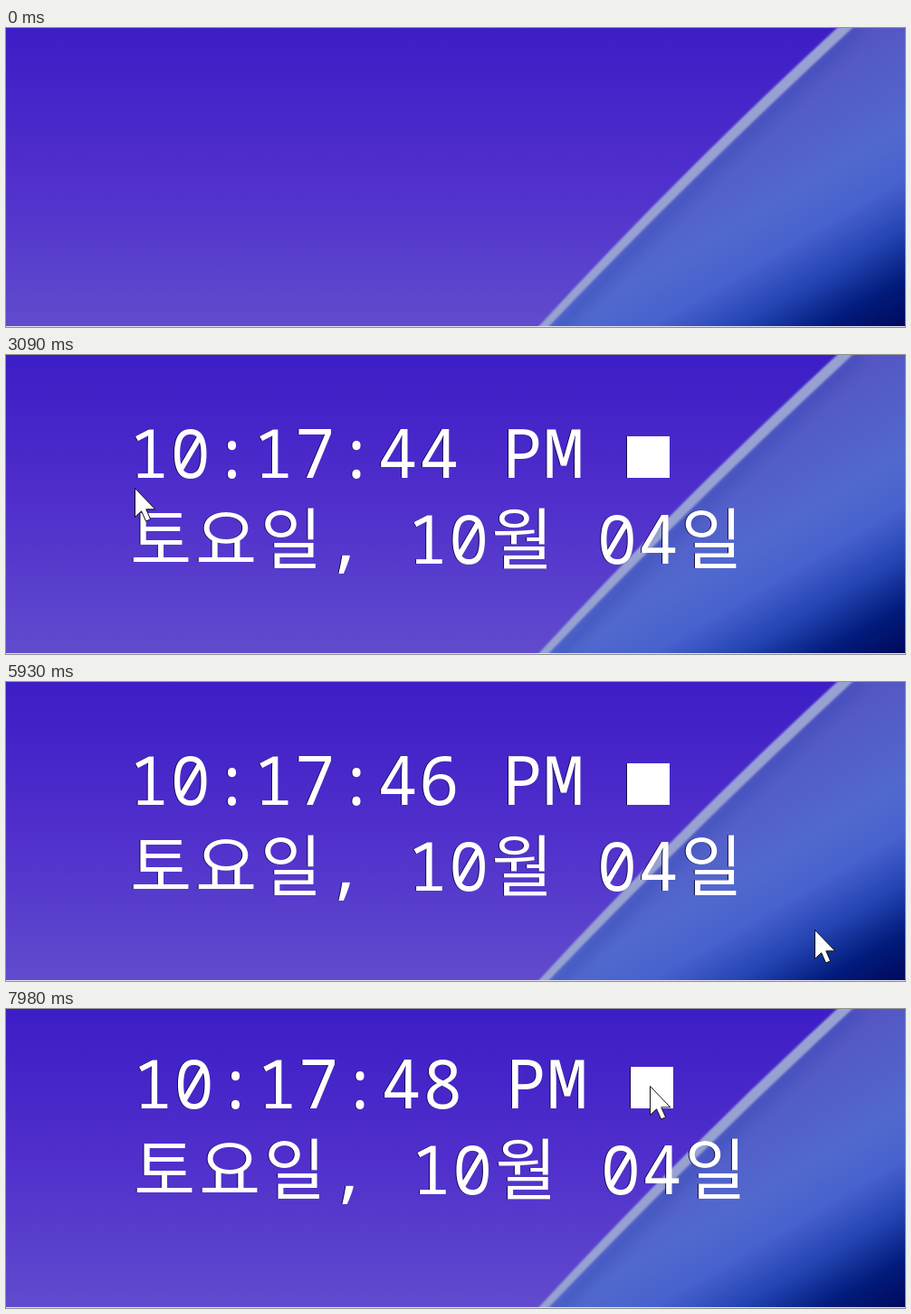
Recreate the animation shown at these times as an HTML page. Size 993x331 px, loop 8 s.

```html
<!DOCTYPE html>
<html lang="ko">
<head>
<meta charset="utf-8">
<style>
  html, body { margin: 0; width: 100%; height: 100%; overflow: hidden; background: #4f2fcc; }
  svg { display: block; width: 993px; height: 331px; }
  text { font: 74px "Noto Sans Mono", "Noto Sans CJK KR", "Noto Sans KR", monospace; text-anchor: middle; }
  #clock { fill: #fff; filter: drop-shadow(-1px 0 0 #160b45); }
</style>
</head>
<body>
<svg viewBox="0 0 993 331">
  <defs>
    <linearGradient id="sky" x2="0" y2="1">
      <stop stop-color="#3d1dc6"/>
      <stop offset=".5" stop-color="#502fcc"/>
      <stop offset="1" stop-color="#614bcd"/>
    </linearGradient>
    <linearGradient id="petal" gradientUnits="userSpaceOnUse" x1="239" y1="405" x2="401" y2="681">
      <stop stop-color="#5553c2"/>
      <stop offset=".4" stop-color="#5169ce"/>
      <stop offset=".55" stop-color="#4761ce"/>
      <stop offset=".7" stop-color="#2344b2"/>
      <stop offset=".85" stop-color="#021b7c"/>
      <stop offset="1" stop-color="#00085a"/>
    </linearGradient>
    <filter id="soft"><feGaussianBlur stdDeviation="6"/></filter>
    <filter id="edge"><feGaussianBlur stdDeviation=".8"/></filter>
    <clipPath id="inside"><path d="M588 331Q742 163 920 0H993V331Z"/></clipPath>
  </defs>

  <rect width="993" height="331" fill="url(#sky)"/>
  <g clip-path="url(#inside)">
    <rect x="580" width="413" height="331" fill="url(#petal)"/>
    <path d="M604 340Q762 170 944 0" fill="none" stroke="#3349b4" stroke-width="12" opacity=".4" filter="url(#soft)"/>
  </g>
  <path d="M586 333Q742 163 920 -2L937 -2Q757 165 597 333Z" fill="#98a2d2" filter="url(#edge)"/>
  <rect y="330" width="993" height="1" fill="#e6e4f4"/>

  <g id="clock">
    <text id="time" y="134"></text>
    <rect x="682" y="88" width="47" height="46"/>
    <text id="date" y="229"></text>
  </g>
  <g id="press">
    <rect id="area" fill="#0078d7" fill-opacity=".5" stroke="#0078d7"/>
    <circle id="disc" r="24" fill="#eeee3c" opacity=".62"/>
  </g>
  <path id="cursor" d="M.5 .5V32.5L7.6 25.8L12.6 37L17.6 34.8L12.8 23.8H22.8Z" fill="#fff" stroke="#111"/>
</svg>
<script>
const $ = id => document.getElementById(id);
const LOOP = 8000, STEP = 70, APPEAR = 1440, GRAB = 7140, END = 7980;
const corner = { x: 852, y: 257 };  // where the selection starts

// Moves: [depart, arrive, x, y]
const clockMoves = [[0, 0, -180, -100], [APPEAR, 1790, 0, 0], [1790, 1930, 4, 2]];
const cursorMoves = [
  [0, 0, 786, 51],
  [APPEAR, 1790, 720, 106],
  [2260, 2480, 860, 273],
  [2600, 3090, 142, 147],
  [3440, 3930, corner.x, corner.y],
  [3930, 4210, 723, 244],
  [4210, 4630, 66, 37],
  [4830, 5180, 151, 139],
  [5180, 5930, 893, 274],
  [5930, 6260, 428, 150],
  [6260, 6680, 895, 49],
  [6750, GRAB, 707, 111]
];

// Eased position along the latest move, advancing in whole steps
function glide(moves, t) {
  const i = moves.findLastIndex(m => m[0] <= t);
  const [depart, arrive, x, y] = moves[i];
  if (t >= arrive) return [x, y];
  const [, , x0, y0] = moves[i - 1];
  const p = Math.floor((t - depart) / STEP) * STEP / (arrive - depart);
  const ease = p * p * (3 - 2 * p);
  return [x0 + (x - x0) * ease, y0 + (y - y0) * ease].map(Math.round);
}

// How far the clock has been dragged from side to side by its handle
function drag(t) {
  const u = Math.min(1, Math.max(0, Math.floor((t - GRAB) / STEP) * STEP / (END - GRAB)));
  const sway = 130 * u * Math.sin(Math.PI * u) * Math.cos(4 * Math.PI * u);
  return [4 * u + sway, -26 * u + .4 * sway].map(Math.round);
}

// Sets each character in the middle of its cell
function typeset(el, str) {
  let x = 131;
  const centres = [...str].map(c => {
    const w = c >= "가" ? 72 : 45.8;
    x += w;
    return x - w / 2;
  });
  el.setAttribute("x", centres.join(" "));
  el.textContent = str;
}

const show = (id, on) => $(id).style.display = on ? "" : "none";
const move = (id, x, y) => $(id).setAttribute("transform", `translate(${x} ${y})`);

function draw() {
  const t = performance.now() % LOOP;
  const [dx, dy] = drag(t);
  const [clockX, clockY] = glide(clockMoves, t);
  const [x, y] = glide(cursorMoves, t);

  typeset($("time"), `10:17:${46 + Math.floor((t - 4930) / 1040)} PM`);
  show("clock", t >= APPEAR);
  move("clock", clockX + dx, clockY + dy);
  show("cursor", t >= APPEAR || (t >= 500 && t < 570));
  move("cursor", x + dx, y + dy);

  show("press", t >= 3930 && t < 4280);
  move("disc", x, y);
  const left = Math.min(corner.x, x + 25), top = Math.min(corner.y, y + 4);
  const area = { x: left + .5, y: top + .5, width: corner.x - left, height: corner.y - top };
  for (const name in area) $("area").setAttribute(name, area[name]);

  requestAnimationFrame(draw);
}

typeset($("date"), "토요일, 10월 04일");
draw();
</script>
</body>
</html>
```
